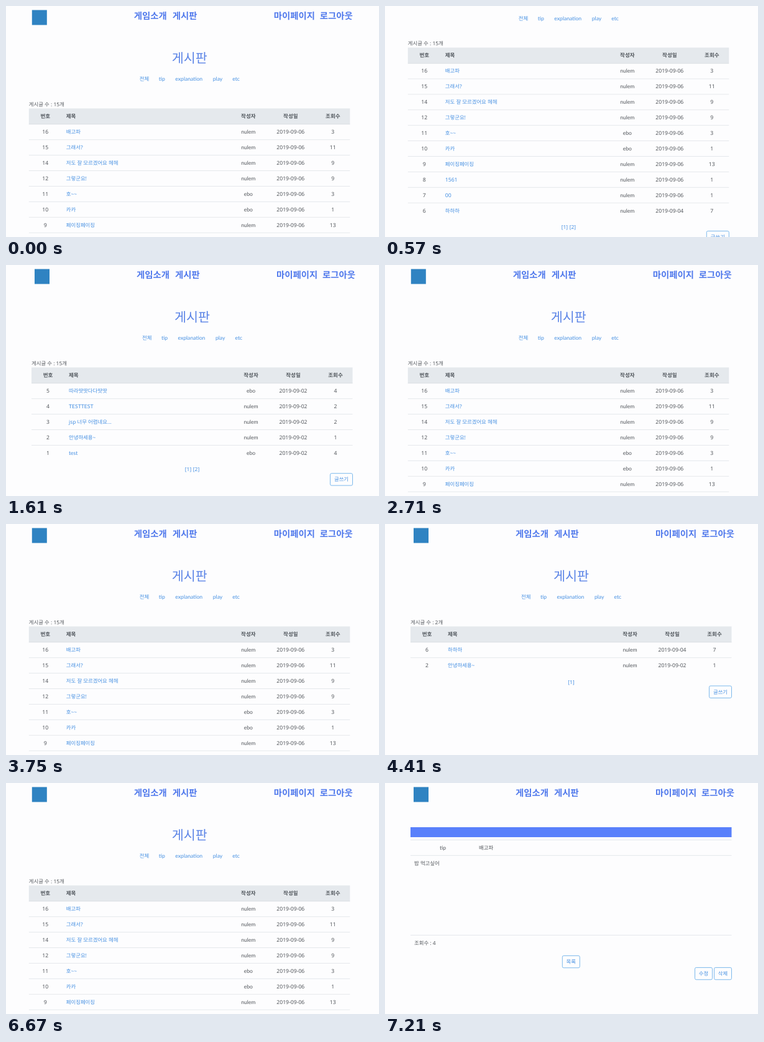
An HTML page for the animation above (7.99 s loop, 600x371 px).

```html
<!DOCTYPE html>
<html lang="ko">
<head>
<meta charset="utf-8">
<title>게시판</title>
<style>
  html, body { margin: 0; width: 100%; height: 100%; overflow: hidden; background: #fdfdfe; }
  svg { display: block; width: 100%; height: 100%; text-rendering: geometricPrecision; }
  text { font: 400 8.4px "Noto Sans", "Noto Sans CJK KR", "Noto Sans CJK", sans-serif; fill: #54585d; white-space: pre; }
  .word { font-family: Lato, "Noto Sans", sans-serif; font-size: 8.6px; }
  .number { font-size: 8.65px; }
  .mid { text-anchor: middle; }
  .link { fill: #4690e2; }
  .hover { fill: #2768ae; }
  .head { font-weight: 700; font-size: 8.5px; fill: #50565c; }
  .nav { font-weight: 900; font-size: 14.4px; fill: #5079ec; }
  .title { font-weight: 300; font-size: 20.7px; fill: #5a83e6; }
  .line { fill: #e3e6ea; }
  .button { fill: #fdfdfe; stroke: #6fb2ea; stroke-width: .9; }
</style>
</head>
<body>
<svg id="stage" viewBox="0 0 600 371"></svg>
<script>
const LOOP = 7990, ROW = 24.9, LEFT = 41, WIDTH = 516.5;
const COLUMNS = { number: 67.5, title: 101, author: 394, date: 462, views: 530 };
const stage = document.getElementById('stage');

function add(parent, tag, attributes) {
  const node = document.createElementNS('http://www.w3.org/2000/svg', tag);
  for (const key in attributes) node.setAttribute(key, attributes[key]);
  return parent.appendChild(node);
}

// y is the vertical centre of the text line
function label(parent, x, y, string, style = '', drop = 3) {
  const kind = /^[\d-]+$/.test(string) ? 'number' : /^[a-z]+$/i.test(string) ? 'word' : '';
  const node = add(parent, 'text', { x, y: y + drop, class: `${kind} ${style}` });
  node.textContent = string;
  return node;
}

function rect(parent, x, y, width, height, attributes) {
  return add(parent, 'rect', { x, y, width, height, ...attributes });
}

function line(parent, y) {
  rect(parent, LEFT, y - .4, WIDTH, .9, { class: 'line' });
}

function button(parent, x, y, width, string) {
  rect(parent, x, y, width, 19.4, { rx: 2.2, class: 'button' });
  label(parent, x + width / 2, y + 9.7, string, 'mid link');
}

function page() {
  const root = add(stage, 'g', { visibility: 'hidden' });
  rect(root, 46, 6.5, 24, 24, { fill: '#2f83c2' });
  [[210, '게임소개'], [272, '게시판'], [435, '마이페이지'], [509, '로그아웃']]
    .forEach(([x, name]) => label(root, x, 15, name, 'nav', 5.5));
  return { root, links: {} };
}

function board(count, rows, pages) {
  const view = page(), { root, links } = view;
  const link = (x, y, name, style = '') => links[name] = label(root, x, y, name, `link ${style}`);

  label(root, 299.5, 83, '게시판', 'title mid', 7.5);
  [[219, '전체'], [250, 'tip'], [276.5, 'explanation'], [337, 'play'], [368.5, 'etc']]
    .forEach(([x, name]) => link(x, 117.3, name));
  label(root, LEFT, 158, `게시글 수 : ${count}개`);

  rect(root, LEFT, 164.5, WIDTH, 25.5, { fill: '#e5e9ed' });
  rect(root, LEFT, 189.4, WIDTH, .9, { fill: '#d9dee2' });
  label(root, COLUMNS.number, 177, '번호', 'head mid');
  label(root, COLUMNS.title, 177, '제목', 'head');
  label(root, COLUMNS.author, 177, '작성자', 'head mid');
  label(root, COLUMNS.date, 177, '작성일', 'head mid');
  label(root, COLUMNS.views, 177, '조회수', 'head mid');

  rows.forEach(([number, title, author, day, views], i) => {
    const y = 202.2 + ROW * i;
    if (i) line(root, 189.8 + ROW * i);
    label(root, COLUMNS.number, y, String(number), 'mid');
    link(COLUMNS.title, y, title);
    label(root, COLUMNS.author, y, author, 'mid');
    label(root, COLUMNS.date, y, `2019-09-0${day}`, 'mid');
    label(root, COLUMNS.views, y, String(views), 'mid');
  });

  const end = ROW * rows.length;
  for (let i = 1; i <= pages; i++)
    link(299.5 + 13 * (i - (pages + 1) / 2), 203.8 + end, `[${i}]`, 'mid');
  button(root, 521.5, pages ? 210.2 + end : 198.5, 36, '글쓰기');
  return view;
}

function post() {
  const view = page(), { root } = view;
  rect(root, LEFT, 71, WIDTH, 16, { fill: '#5980fb' });
  [91.5, 116.3, 244.3].forEach(y => line(root, y));
  label(root, 88, 103.7, 'tip');
  label(root, 151, 103.7, '배고파');
  label(root, 47, 128.5, '밥 먹고싶어');
  label(root, 47, 256.5, '조회수 : 4');
  button(root, 285.3, 277.4, 28, '목록');
  button(root, 498.5, 296.4, 28, '수정');
  button(root, 529.5, 296.4, 28, '삭제');
  return view;
}

const A = 'nulem', B = 'ebo';
const first = board(15, [
  [16, '배고파', A, 6, 3], [15, '그래서?', A, 6, 11], [14, '저도 잘 모르겠어요 헤헤', A, 6, 9],
  [12, '그렇군요!', A, 6, 9], [11, '호~~', B, 6, 3], [10, '카카', B, 6, 1],
  [9, '페이징페이징', A, 6, 13], [8, '1561', A, 6, 1], [7, '00', A, 6, 1], [6, '하하하', A, 4, 7]
], 2);
const second = board(15, [
  [5, '따라땃땃다다땃땃', B, 2, 4], [4, 'TESTTEST', A, 2, 2], [3, 'jsp 너무 어렵네요...', A, 2, 2],
  [2, '안녕하세용~', A, 2, 1], [1, 'test', B, 2, 4]
], 2);
const filtered = board(2, [[6, '하하하', A, 4, 7], [2, '안녕하세용~', A, 2, 1]], 1);
const empty = board(0, [], 0);
const detail = post();
const views = [first, second, filtered, empty, detail];

// start time, view, hovered link
const timeline = [
  [0, first], [1230, first, '[2]'], [1610, second], [2330, second, '[1]'], [2710, first],
  [4350, filtered], [5390, empty], [5690, empty, 'tip'], [6190, first],
  [6970, first, '배고파'], [7150, detail]
];

function scrollAt(t) {
  if (t < 510 || t >= 1610) return 0;
  const progress = Math.min(1, (1 + Math.floor((t - 510) / 60)) / 5);
  return 120 * (1 - (1 - progress) ** 3.3);
}

function draw(t) {
  const [, current, hovered] = timeline.findLast(([start]) => t >= start);
  for (const view of views) {
    view.root.setAttribute('visibility', view === current ? 'visible' : 'hidden');
    for (const name in view.links)
      view.links[name].classList.toggle('hover', view === current && name === hovered);
  }
  // the long list has a scrollbar, which moves its content to the left
  first.root.setAttribute('transform', `translate(-4.2 ${-scrollAt(t)})`);
}

const origin = performance.now();
function tick() {
  draw((performance.now() - origin) % LOOP);
  requestAnimationFrame(tick);
}
tick();
</script>
</body>
</html>
```
